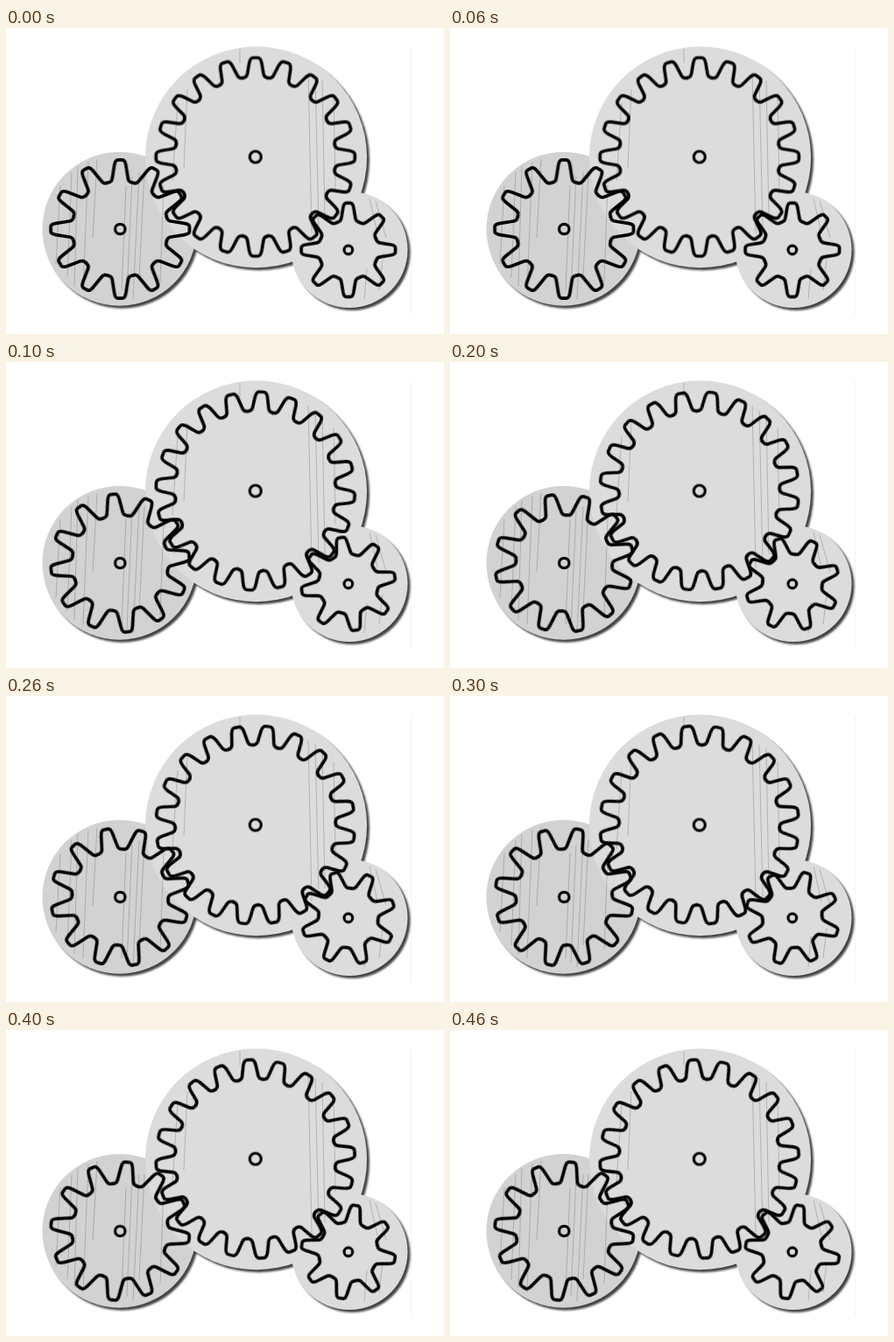
An HTML page without scripts for the animation above (0.5 s loop, 500 by 350 pixels).

```html
<!DOCTYPE html>
<html lang="en">
<head>
<meta charset="utf-8">
<title>Gear train</title>
<style>
  html, body { margin: 0; width: 100%; height: 100%; overflow: hidden; background: #fff; }
  svg { display: block; width: 100vw; height: 100vh; }
  .discs { fill: #dcdcdc; filter: drop-shadow(3px 3.5px 1.2px #444); }
  .discs .shaded { fill: #d2d2d2; }
  .grain { fill: none; stroke: #666; stroke-opacity: .35; }
  .gears { fill: none; stroke: #000; stroke-width: 3.7; stroke-linejoin: round; stroke-linecap: round; }
  .gears circle { stroke-width: 3.2; }
  /* Each gear advances one tooth per loop, in five steps. */
  .spin { animation: turn .5s steps(5, end) infinite; }
  .large { --pitch: 18deg; }
  .medium { --pitch: -30deg; }
  .small { --pitch: -45deg; }
  @keyframes turn { to { transform: rotate(var(--pitch)); } }
</style>
</head>
<body>
<svg viewBox="0 0 500 350">
  <defs>
    <path id="toothL" d="M-14.3-90.4Q-10-91-9.2-95L-7.2-107Q-6-113.5-2.5-113.5H2.5Q6-113.5 7.2-107L9.2-95Q10-91 14.3-90.4"/>
    <g id="quarterL">
      <use href="#toothL"/>
      <use href="#toothL" transform="rotate(18)"/>
      <use href="#toothL" transform="rotate(36)"/>
      <use href="#toothL" transform="rotate(54)"/>
      <use href="#toothL" transform="rotate(72)"/>
    </g>
    <path id="toothM" d="M-14.2-53L-12.6-53.5Q-9.6-54.2-9-58L-6.6-73Q-5.6-79.2-2.5-79.2H2.5Q5.6-79.2 6.6-73L9-58Q9.6-54.2 12.6-53.5L14.2-53"/>
    <g id="quarterM">
      <use href="#toothM"/>
      <use href="#toothM" transform="rotate(30)"/>
      <use href="#toothM" transform="rotate(60)"/>
    </g>
    <path id="toothS" d="M-13-31.4L-11-32.2Q-8.4-33.3-7.9-37L-6-48.5Q-5-53.7-2.5-53.7H2.5Q5-53.7 6-48.5L7.9-37Q8.4-33.3 11-32.2L13-31.4"/>
    <g id="quarterS">
      <use href="#toothS"/>
      <use href="#toothS" transform="rotate(45)"/>
    </g>
  </defs>

  <path d="M462.5 22V328" stroke="#f5f5f5"/>
  <g class="discs">
    <circle class="shaded" cx="129.5" cy="229.8" r="88"/>
    <circle cx="285.5" cy="147.8" r="126.5"/>
    <circle cx="392" cy="253.5" r="66.5"/>
  </g>
  <path class="grain" d="M62 180L57 270M75 165L70 285M82 158L78 295M94 153L88 300M104 150L99 240M137 180L132 300M144 170L138 305M152 165L145 310M158 165L152 285M180 180L176 290M196 85L190 175M207 70L203 160M267 24V40M345 50L349 235M353 55L357 230M361 60L364 220M374 75L376 185M415 195L424 235M422 198L434 240M412 275L409 310M430 265L426 300"/>

  <g class="gears">
    <g transform="translate(284.7 147.5)">
      <g class="spin large">
        <use href="#quarterL"/>
        <use href="#quarterL" transform="rotate(90)"/>
        <use href="#quarterL" transform="rotate(180)"/>
        <use href="#quarterL" transform="rotate(270)"/>
      </g>
      <circle r="6.5"/>
    </g>
    <g transform="translate(130.3 230)">
      <g class="spin medium">
        <use href="#quarterM"/>
        <use href="#quarterM" transform="rotate(90)"/>
        <use href="#quarterM" transform="rotate(180)"/>
        <use href="#quarterM" transform="rotate(270)"/>
      </g>
      <circle r="5.7"/>
    </g>
    <g transform="translate(390.8 253.8)">
      <g class="spin small">
        <use href="#quarterS"/>
        <use href="#quarterS" transform="rotate(90)"/>
        <use href="#quarterS" transform="rotate(180)"/>
        <use href="#quarterS" transform="rotate(270)"/>
      </g>
      <circle r="4.8"/>
    </g>
  </g>
</svg>
</body>
</html>
```
